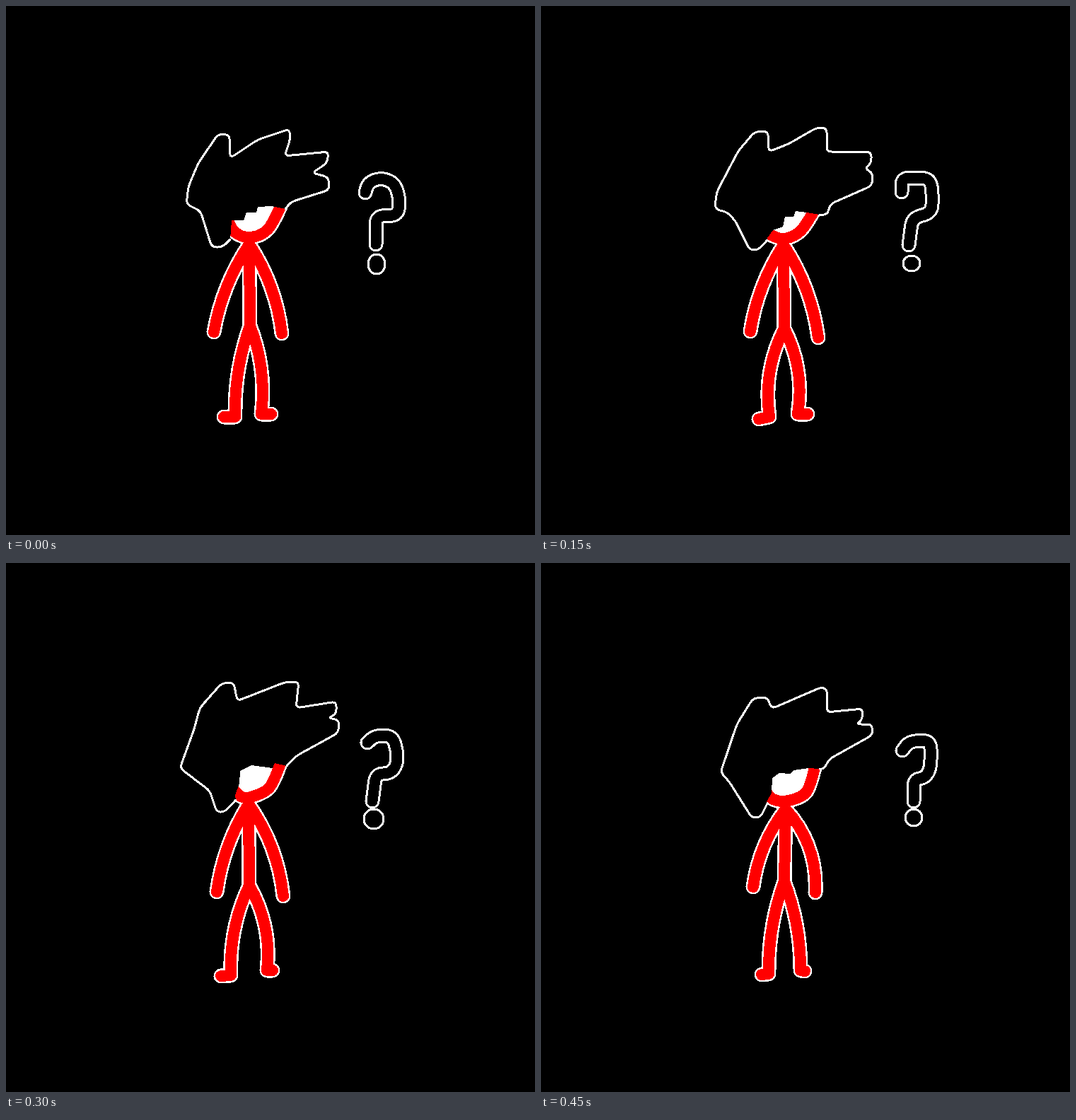
These frames come from a looping animation (748x748 px, 0.6 s). An HTML page:

```html
<!DOCTYPE html>
<html lang="en">
<head>
<meta charset="utf-8">
<title>Puzzled stick figure</title>
<style>
  html, body { margin: 0; width: 100%; height: 100%; overflow: hidden; background: #000; }
  svg { display: block; width: 100%; height: 100%; }
  path { fill: none; stroke-linecap: round; stroke-linejoin: round; }
  .edge { stroke: #fff; stroke-width: 21; }
  .limb { stroke: #f00; stroke-width: 16; }
  .face { fill: #fff; }
  .hair { fill: #000; }
  .core { stroke: #000; stroke-width: 15; }
  .line { stroke: #fff; stroke-width: 3; }
</style>
</head>
<body>
<svg id="stage" viewBox="0 0 748 748" shape-rendering="crispEdges"></svg>
<script>
const STEP = 150;

// Key points of each pose. Arms are [x, y, bow] at the hand,
// legs are [x, y, bow, toeX, toeY] at the heel, left limb first.
const poses = [
  {
    neck: [344, 337], hip: [345, 452],
    arms: [[294, 461, 7], [390, 463, -8]],
    legs: [[324, 581, 6, 308, 581], [361, 577, -8, 375, 577]],
    jaw: "312,300 324,320 346,327 370,316 388,284",
    hair: "317,330 306,341 291,341 275,290 255,280 258,255 272,222 300,181 316,182 317,215 356,189 401,174 402,188 394,212 456,206 454,222 433,236 456,242 457,260 403,277 395,287",
    fringe: "376,283 356,284 354,292 340,292 336,303 319,303",
    hook: "508,264 512,250 529,243 548,249 556,268 555,296 523,297 523,337",
    dot: [524, 365, 12, 14]
  },
  {
    neck: [343, 338], hip: [344, 456],
    arms: [[296, 460, 7], [392, 469, -8]],
    legs: [[323, 581, 10, 308, 584], [363, 577, -10, 377, 577]],
    jaw: "316,318 330,326 345,329 367,318 386,290",
    hair: "320,331 307,345 295,345 275,304 264,292 246,287 248,264 279,205 302,178 321,177 322,206 350,195 390,172 404,172 404,206 467,206 467,222 458,230 469,236 468,254 409,280 405,295 394,295",
    fringe: "376,292 360,290 357,298 345,298 342,312 328,317 320,328",
    hook: "510,263 510,243 546,243 553,254 553,292 525,300 520,338",
    dot: [524, 364, 12, 11]
  },
  {
    neck: [343, 341], hip: [344, 456],
    arms: [[298, 465, 7], [392, 471, -9]],
    legs: [[318, 583, 8, 304, 584], [369, 576, -10, 377, 576]],
    jaw: "320,318 332,330 346,331 372,318 388,284",
    hair: "325,335 309,352 298,352 288,322 246,290 266,235 274,205 305,170 322,169 327,195 396,168 414,168 410,205 467,196 467,214 455,219 471,222 470,240 410,273 397,287",
    fringe: "380,283 377,290 347,286 331,294 330,312 324,328",
    hook: "511,254 522,244 546,244 553,265 553,285 543,298 523,298 518,337",
    dot: [520, 362, 14, 14]
  },
  {
    neck: [346, 348], hip: [344, 450],
    arms: [[300, 458, 8], [388, 466, -13]],
    legs: [[322, 581, 6, 312, 582], [367, 576, -6, 373, 577]],
    jaw: "316,320 328,334 350,336 375,324 387,290",
    hair: "320,340 310,360 298,360 266,309 254,296 277,228 300,191 320,190 326,206 398,175 405,181 404,211 455,206 454,222 446,228 468,228 469,243 408,277 400,291 394,291",
    fringe: "378,290 358,293 352,298 337,297 327,304 326,325 319,338",
    hook: "511,265 521,252 551,251 551,290 543,304 527,306 527,337",
    dot: [527, 360, 12, 12]
  }
];

const parse = text => text.split(" ").map(pair => pair.split(",").map(Number));

// Point on the way from a to b, at most `cut` long and never past the middle
function toward(a, b, cut) {
  const k = Math.min(cut / Math.hypot(b[0] - a[0], b[1] - a[1]), 0.5);
  return [a[0] + (b[0] - a[0]) * k, a[1] + (b[1] - a[1]) * k];
}

// Straight run with rounded corners
function rounded(text, cut) {
  const pts = parse(text);
  const corners = pts.slice(1, -1).map((p, i) =>
    `L${toward(p, pts[i], cut)}Q${p} ${toward(p, pts[i + 2], cut)}`);
  return `M${pts[0]}${corners.join("")}L${pts.at(-1)}`;
}

// Catmull-Rom curve through all points
function smooth(text) {
  const pts = parse(text);
  const at = i => pts[Math.max(0, Math.min(pts.length - 1, i))];
  const handle = (i, sign) => at(i).map((v, k) => v + sign * (at(i + 1)[k] - at(i - 1)[k]) / 6);
  return `M${pts[0]}` + pts.slice(1).map((p, i) =>
    `C${handle(i, 1)} ${handle(i + 1, -1)} ${p}`).join("");
}

// Curve from a to b whose middle is pushed sideways by `bow`
function bowed(a, b, bow) {
  const dx = b[0] - a[0], dy = b[1] - a[1];
  const k = 2 * bow / Math.hypot(dx, dy);
  return `M${a}Q${(a[0] + b[0]) / 2 - dy * k},${(a[1] + b[1]) / 2 + dx * k} ${b}`;
}

function body({ neck, hip, arms, legs, jaw }) {
  return `M${neck}L${hip}`
    + arms.map(([x, y, bow]) => bowed(neck, [x, y], bow)).join("")
    + legs.map(([x, y, bow, ...toe]) => bowed(hip, [x, y], bow) + `L${toe}`).join("")
    + smooth(jaw);
}

const ellipse = ([x, y, rx, ry]) =>
  `M${x - rx},${y}a${rx},${ry} 0 1 1 ${2 * rx},0a${rx},${ry} 0 1 1 ${-2 * rx},0Z`;

const hairLine = p => rounded(p.hair, 7);
const hook = p => rounded(p.hook, 12);

// Painted in this order, from back to front
const layers = [
  ["edge", body],
  ["face", p => smooth(p.jaw) + "L345,260Z"],
  ["limb", body],
  ["hair", p => hairLine(p) + `L${p.fringe}Z`],
  ["line", hairLine],
  ["edge", hook],
  ["core", hook],
  ["line", p => ellipse(p.dot)]
];

const stage = document.getElementById("stage");
const paths = layers.map(([name]) => {
  const path = document.createElementNS("http://www.w3.org/2000/svg", "path");
  path.setAttribute("class", name);
  return stage.appendChild(path);
});

let shown = -1;

function draw(time) {
  const index = Math.floor(time / STEP) % poses.length;
  if (index === shown) return;
  shown = index;
  layers.forEach(([, shape], i) => paths[i].setAttribute("d", shape(poses[index])));
}

let start;
function tick(now) {
  start ??= now;
  draw(Math.max(0, now - start));
  requestAnimationFrame(tick);
}

draw(0);
requestAnimationFrame(tick);
</script>
</body>
</html>
```
